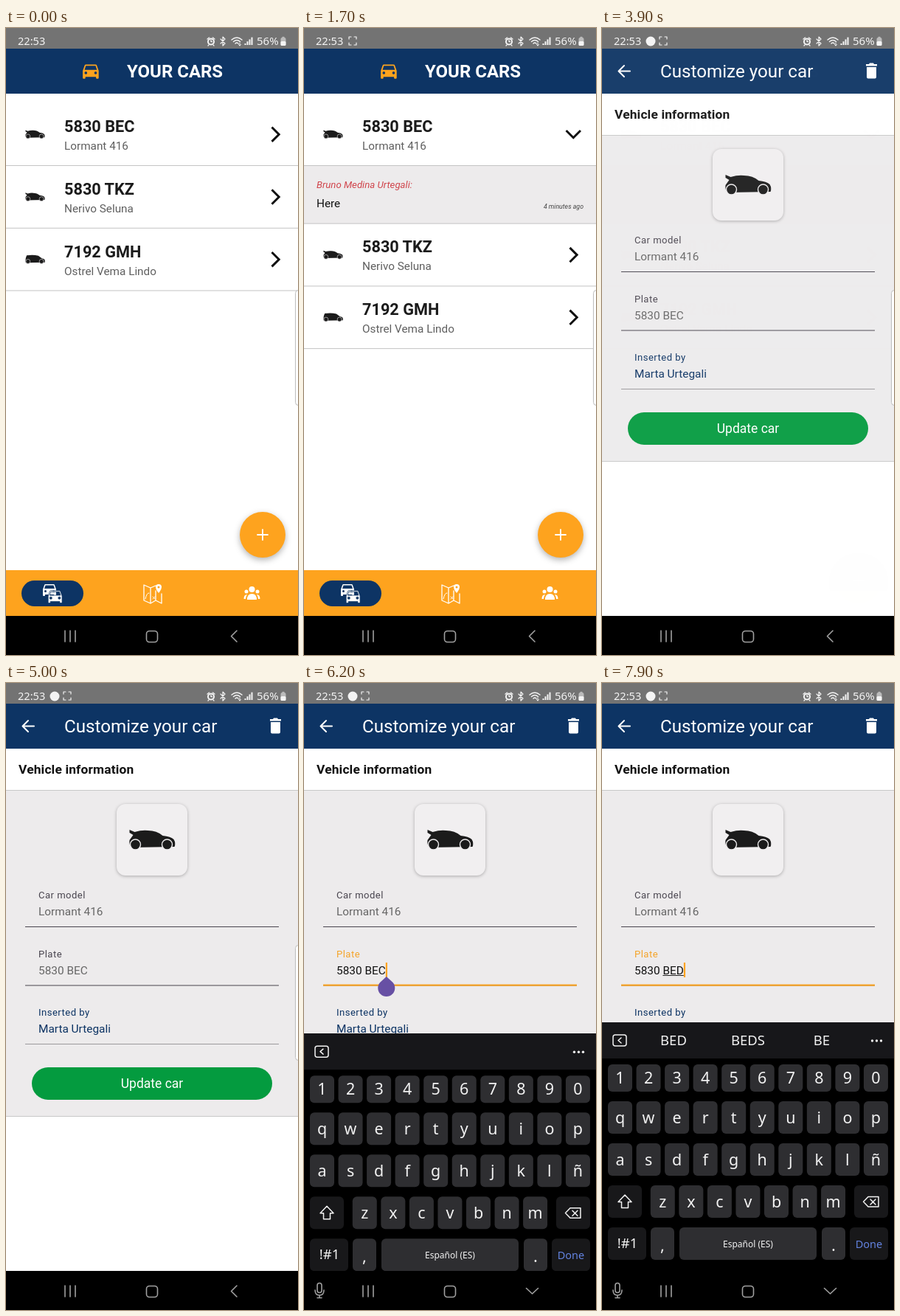
An HTML page that plays this animation: 396x850 px, repeating every 8000 ms.

```html
<!DOCTYPE html>
<html lang="en">
<head>
<meta charset="utf-8">
<title>Your cars</title>
<style>
  html, body { margin: 0; width: 100%; height: 100%; overflow: hidden; background: #fff; }
  svg { display: block; width: 100%; height: 100%; font-family: Roboto, sans-serif; }
  text { white-space: pre; }
  .status, .keys { font-family: "Noto Sans", sans-serif; }
  .mid { text-anchor: middle; }
  .line { fill: none; stroke-linecap: round; stroke-linejoin: round; }
  .fab { filter: drop-shadow(0 3px 4px rgba(0, 0, 0, .3)); }
  .card { filter: drop-shadow(0 1px 2px rgba(0, 0, 0, .28)); }
</style>
</head>
<body>
<svg id="stage" viewBox="0 0 396 850" xmlns="http://www.w3.org/2000/svg"></svg>
<script>
const LOOP = 8000, PANEL = 78.6;
const NAVY = '#0d3464', ORANGE = '#fea31e', GRAY = '#edebec', INK = '#1b1b1b';
const PLATE = '5830 BEC';

const text = (x, y, s, size, fill = INK, attrs = '') =>
  `<text x="${x}" y="${y}" font-size="${size}" fill="${fill}" ${attrs}>${s}</text>`;
const rect = (x, y, w, h, fill, attrs = '') =>
  `<rect x="${x}" y="${y}" width="${w}" height="${h}" fill="${fill}" ${attrs}/>`;
const circle = (x, y, r, fill, attrs = '') =>
  `<circle cx="${x}" cy="${y}" r="${r}" fill="${fill}" ${attrs}/>`;
const line = (d, color, width = 1, attrs = '') =>
  `<path class="line" d="${d}" stroke="${color}" stroke-width="${width}" ${attrs}/>`;
const shape = (d, fill, attrs = '') => `<path d="${d}" fill="${fill}" ${attrs}/>`;
const group = (id, body, attrs = '') => `<g id="${id}" ${attrs}>${body}</g>`;
const at = (x, y, scale, body) => `<g transform="translate(${x} ${y}) scale(${scale})">${body}</g>`;

const frontCar = (fill, attrs = '') => shape(
  'M18.9 6Q18.5 5 17.5 5h-11Q5.500 5 5.100 6L3 12v8q0 1 1 1h1q1 0 1-1v-1h12v1q0 1 1 1h1q1 0 1-1v-8z' +
  'M5 14.500a1.500 1.500 0 1 0 3 0a1.500 1.500 0 1 0-3 0zM16 14.500a1.500 1.500 0 1 0 3 0a1.500 1.500 0 1 0-3 0z' +
  'M5 11l1.500-4.500h11L19 11z', fill, 'fill-rule="evenodd" ' + attrs);

const wheels = [9, 52].map(x => circle(x, 21, 7, INK, `stroke="${GRAY}" stroke-width="1.4"`)).join('');
const hatchback = shape(
  'M1 1L8 4Q18 1 26 2Q38 2 46 9Q57 10 61 14Q64 19 62 24L4 25Q0 22 1 15L6 8L1 5z', INK) + wheels;
const van = shape('M5 2Q26-1 42 3L54 12Q62 13 63 18V24L2 25Q-1 15 5 2z', INK) + wheels;

function statusBar() {
  const white = '#f4f4f4';
  const bars = [0, 1, 2, 3].map(i => rect(323.5 + i * 3, 21 - i * 2.8, 2, 2 + i * 2.8, white)).join('');
  return `<g class="status">` + rect(0, 0, 396, 28, '#737373') +
    text(16, 23, '22:53', 14.6, white) +
    circle(66, 18, 6.5, white, 'id="notice"') +
    group('recorder',
      line('M61 15v-3h3M68 12h3v3M71 20v3h-3M64 23h-3v-3', white, 1.2) +
      circle(66, 17.5, 2.3, 'none', `id="recDot" stroke="${white}" stroke-width="1.2"`)) +
    circle(278, 18.5, 4, 'none', `stroke="${white}" stroke-width="2"`) +
    line('M273 15l2.500-2M283 15l-2.500-2M275 23l-1 1M281 23l1 1M278 16.500v2h1.500', white, 1.3) +
    line('M291 15l6 6-3 3V12l3 3-6 6', white, 1.2) +
    line('M306 16q7-6 14 0M308.500 18.500q4.500-4 9 0M311 21q2-2 4 0', white, 1.5) +
    line('M317 20v4m-1.500-1.500l1.500 1.500 1.500-1.500', white, 1) + bars +
    text(340, 23, '56%', 15, white) +
    rect(372.500, 13, 7, 11, '#bbb', 'rx="2"') + rect(372.500, 18, 7, 6, white, 'rx="1.500"') +
    rect(374.500, 11.800, 3, 2, '#bbb') + '</g>';
}

function carRow(y, plate, model, icon, id) {
  return at(26, y + 49, .425, icon) +
    text(79, y + 52, plate, 21.7, INK, 'font-weight="700"') +
    text(79, y + 76, model, 15.3, '#5f5f5f') +
    `<path id="${id}" d="M360.500 ${y + 45.500}l9.700 9.700-9.700 9.700" fill="none" stroke="#111" stroke-width="3"/>` +
    rect(0, y + 97, 396, 1, '#c4c4c4');
}

function listPage() {
  const plus = line('M341 687h14M348 680v14', '#fff', 1.8, 'stroke-linecap="butt"');
  return rect(0, 28, 396, 769, '#fff') + rect(0, 28, 396, 61, NAVY) +
    at(100.500, 43.500, 1.2, frontCar(ORANGE)) +
    text(164, 67, 'YOUR CARS', 24, '#fff', 'font-weight="700"') +
    carRow(89, PLATE, 'Lormant 416', hatchback, 'chevron') +
    group('panel',
      rect(0, 187, 396, 78, GRAY) +
      text(17, 217, 'Bruno Medina Urtegali:', 13.2, '#d0454c', 'font-style="italic"') +
      text(17, 243, 'Here', 15.3, '#111') +
      text(379, 245, '', 8.8, '#444', 'id="age" font-style="italic" text-anchor="end"'),
      'clip-path="url(#panelClip)"') +
    group('lower',
      rect(0, 186, 396, 1, '#c4c4c4') +
      carRow(173.800, '5830 TKZ', 'Nerivo Seluna', hatchback, 'chevron2') +
      carRow(258.500, '7192 GMH', 'Ostrel Vema Lindo', van, 'chevron3')) +
    group('fab', circle(348, 687, 31, ORANGE, 'class="fab"') + plus) +
    group('tabs', tabBar());
}

function tabBar() {
  const person = (x, y, r) => circle(x, y, r, '#fff');
  return rect(0, 735, 396, 62, ORANGE) +
    rect(21, 749, 84, 35, NAVY, 'rx="17.500"') +
    at(47, 749, 1, frontCar('#fff')) +
    at(54, 757.500, 1.05, frontCar('#fff', `stroke="${NAVY}" stroke-width=".7"`)) +
    line('M204 757l-1-1-7 3-9-4v21l9 4 7-4 8 4v-13M196 759v21M203 763v13', '#fff', 1.3) +
    line('M189 774q2-9 5-8M199 771l3 3M199 774l3-3', '#fff', 1) +
    shape('M207 766q-4-5-4-8a4 4 0 0 1 8 0q0 3-4 8z', '#fff') + circle(207, 758, 1.500, ORANGE) +
    person(333.500, 761, 4) + person(326, 764, 2.5) + person(341, 764, 2.5) +
    shape('M327 775q0-8 6.500-8t6.500 8zM322.500 774q0-6 4.500-6-2 3-2 6zM344.500 774q0-6-4.500-6 2 3 2 6z', '#fff');
}

function field(y, label, value, color, labelColor, rule, ids = ['', '', '']) {
  return text(44, y + 5, label, 13.1, labelColor, `letter-spacing=".45" id="${ids[0]}"`) +
    text(44, y + 28, value, 15.4, color, `id="${ids[1]}"`) +
    rect(26, y + 43, 344, 1, rule, `id="${ids[2]}"`);
}

function detailPage() {
  return rect(0, 28, 396, 769, '#fff') + rect(0, 28, 396, 61, NAVY) +
    line('M38 58.500H23M30 51l-7.500 7.500 7.500 7.500', '#fff', 2, 'stroke-linecap="butt"') +
    text(79, 67, 'Customize your car', 24.2, '#fff') +
    shape('M358 49h4l1-1.500h5l1 1.500h4v2.500h-15zM359 53h13v13.500q0 2-2 2h-9q-2 0-2-2z', '#fff') +
    text(17, 123, 'Vehicle information', 17.4, '#111', 'font-weight="700" letter-spacing=".16"') +
    rect(0, 145, 396, 443, '#c8c8c8') + rect(0, 146, 396, 441, GRAY) +
    rect(150, 164, 96, 97, '#f1eff0', 'rx="12" class="card"') +
    at(166.500, 198, 1, hatchback) +
    field(287, 'Car model', 'Lormant 416', '#666', '#49454f', '#49454f') +
    field(366.500, 'Plate', PLATE, '#666', '#49454f', '#49454f', ['plateLabel', 'plate', 'plateRule']) +
    field(446, 'Inserted by', 'Marta Urtegali', NAVY, NAVY, '#9b999c') +
    rect(26, 408.500, 344, 2.300, '#f5a42a', 'id="focusRule"') +
    rect(0, 396, 0, 1, '#222', 'id="composing"') +
    rect(0, 379, 2.200, 20, ORANGE, 'id="cursor"') +
    group('handle', shape('M0 398l8.500 7.800a11.500 11.500 0 1 1-17 0z', '#6750a4')) +
    rect(35, 521, 326, 44, '#049b3f', 'rx="22"') +
    text(198, 549, 'Update car', 17.5, '#fff', 'class="mid"');
}

function keyboard() {
  const white = '#f2f2f2', key = '#2e2e31', dark = '#18181a', pitch = 38.55;
  const cap = (x, y, w, h, fill) => rect(x, y, w, h, fill, 'rx="6"');
  const row = (chars, x0, y, h) => [...chars].map((c, i) => {
    const x = x0 + i * pitch;
    return cap(x, y, 33, h, key) +
      text(x + 16.500, y + h / 2 + 7.500, c, 21.5, white, `class="mid${/\d/.test(c) ? '' : ' letter'}"`);
  }).join('');
  const words = [['BED', 97], ['BEDS', 198], ['BE', 298]];
  return `<g class="keys">` + rect(0, 460, 396, 390, '#000') + rect(0, 460, 396, 49, '#17171a') +
    rect(15, 477, 18, 15, 'none', `rx="3" stroke="${white}" stroke-width="1.500"`) +
    line('M26 481l-4 3.500 4 3.500', white, 1.5) +
    [366.500, 372.500, 378.500].map(x => circle(x, 485, 1.7, white)).join('') +
    group('words', words.map(([w, x]) => text(x, 491, w, 18.5, white, 'class="mid"')).join('')) +
    row('1234567890', 8, 517, 37) + row('qwertyuiop', 8, 567, 44) +
    row('asdfghjklñ', 8, 624, 44) + row('zxcvbnm', 65.800, 681, 44) +
    cap(8, 681, 46, 44, dark) + cap(342, 681, 46, 44, dark) +
    line('M31 694l9 9.500h-4.500v8h-9v-8H22z', white, 1.5, 'id="shift"') +
    line('M361 696.500h14v13.500h-14l-6.500-6.700zM364 700l7 7M371 700l-7 7', white, 1.5) +
    cap(8, 738, 52, 44, dark) + cap(66, 738, 32, 44, key) + cap(105, 738, 186, 44, key) +
    cap(298, 738, 32, 44, key) + cap(336, 738, 52, 44, dark) +
    text(34.500, 766, '!#1', 18.5, white, 'class="mid"') +
    text(82, 770, ',', 22, white, 'class="mid"') + text(314, 770, '.', 22, white, 'class="mid"') +
    text(198, 765, 'Español (ES)', 12, white, 'class="mid"') +
    text(362, 766, 'Done', 14.500, '#6383e0', 'class="mid"') + '</g>';
}

function systemBar() {
  const gray = '#a0a0a0';
  return rect(0, 797, 396, 53, '#000') +
    line('M80 817v15M87 817v15M94 817v15', gray, 1.6) +
    rect(190.500, 817.500, 15, 15, 'none', `rx="4" stroke="${gray}" stroke-width="1.600"`) +
    line('M313 817l-7.500 7.500 7.500 7.500', gray, 1.6, 'id="back"') +
    group('imeNav',
      line('M301.500 820.500l8 7.500 8-7.500M15 823q0 7 6 7t6-7M21 830v3.500M18 833.500h6', gray, 1.6) +
      rect(18, 813.500, 6, 13, 'none', `rx="3" stroke="${gray}" stroke-width="1.600"`));
}

const stage = document.getElementById('stage');
stage.innerHTML =
  `<clipPath id="panelClip"><rect id="panelRect" x="0" y="187" width="396" height="0"/></clipPath>` +
  group('list', listPage()) + group('detail', detailPage()) +
  rect(392.500, 355.500, 14, 156, '#fff', 'id="edge" rx="4" stroke="#bdbdbd"') +
  group('keyboard', keyboard()) + systemBar() + statusBar();

const $ = id => document.getElementById(id);
const set = (id, name, value) => $(id).setAttribute(name, value);
const show = (id, on) => { $(id).style.display = on ? '' : 'none'; };
const move = (id, x, y) => set(id, 'transform', `translate(${x} ${y})`);
const letters = [...stage.querySelectorAll('.letter')];
const progress = (t, from, to) => Math.min(1, Math.max(0, (t - from) / (to - from)));
const easeOut = p => 1 - (1 - p) ** 3;

// cubic-bezier(.4, 0, .2, 1), solved by bisection
function standardEase(p) {
  let lo = 0, hi = 1, s = p;
  for (let i = 0; i < 20; i++) {
    s = (lo + hi) / 2;
    const x = 1.2 * s * (1 - s) ** 2 + .6 * s * s * (1 - s) + s ** 3;
    if (x < p) lo = s; else hi = s;
  }
  return 3 * s * s * (1 - s) + s ** 3;
}

// plate text by time
const edits = [[0, PLATE], [6700, PLATE.slice(0, -1)], [7600, PLATE.slice(0, -1) + 'D']];

function render(t) {
  const open = easeOut(progress(t, 1150, 1600)) * PANEL;
  set('panelRect', 'height', open);
  move('lower', 0, open);
  set('chevron', 'transform', t >= 1150 ? 'rotate(90 365.500 144)' : '');
  $('age').textContent = (t < 2100 ? 4 : 5) + ' minutes ago';

  show('tabs', t < 3400);
  move('fab', 0, t < 3400 ? 0 : 62);
  const fade = standardEase(progress(t, 3400, 4100));
  set('list', 'opacity', 1 - fade);
  set('detail', 'opacity', fade);

  show('recorder', t >= 200);
  show('notice', t >= 2100);
  move('recorder', t >= 2100 ? 17 : 0, 0);
  show('recDot', t >= 6800 && t < 7300);

  const focused = t >= 5800;
  const value = edits.filter(e => e[0] <= t).pop()[1];
  const plate = $('plate');
  plate.textContent = value;
  plate.setAttribute('fill', focused ? '#111' : '#666');
  set('plateLabel', 'fill', focused ? '#f5a42a' : '#49454f');
  show('focusRule', focused);
  const end = 44 + plate.getComputedTextLength();
  const lastEdit = Math.max(5800, edits.filter(e => e[0] <= t).pop()[0]);
  set('cursor', 'x', end);
  show('cursor', focused && (t - lastEdit) % 1000 < 500);
  show('handle', focused && t < 6700);
  move('handle', end + 1, 0);
  const wordStart = 44 + plate.getSubStringLength(0, 5);
  set('composing', 'x', wordStart);
  set('composing', 'width', t >= 7600 ? end - wordStart : 0);

  const rise = easeOut(progress(t, 5930, 6350));
  show('keyboard', rise > 0);
  move('keyboard', 0, (1 - rise) * 340);
  show('edge', t < 5950);
  show('imeNav', focused);
  show('back', !focused);
  set('words', 'opacity', progress(t, 6980, 7180));

  const upper = t >= 7250 && t < 7600;
  set('shift', 'style', upper ? 'fill:#f2f2f2' : '');
  for (const k of letters) {
    k.textContent = upper ? k.textContent.toUpperCase() : k.textContent.toLowerCase();
  }
}

const start = performance.now();
function tick() {
  render((performance.now() - start) % LOOP);
  requestAnimationFrame(tick);
}
tick();
</script>
</body>
</html>
```
